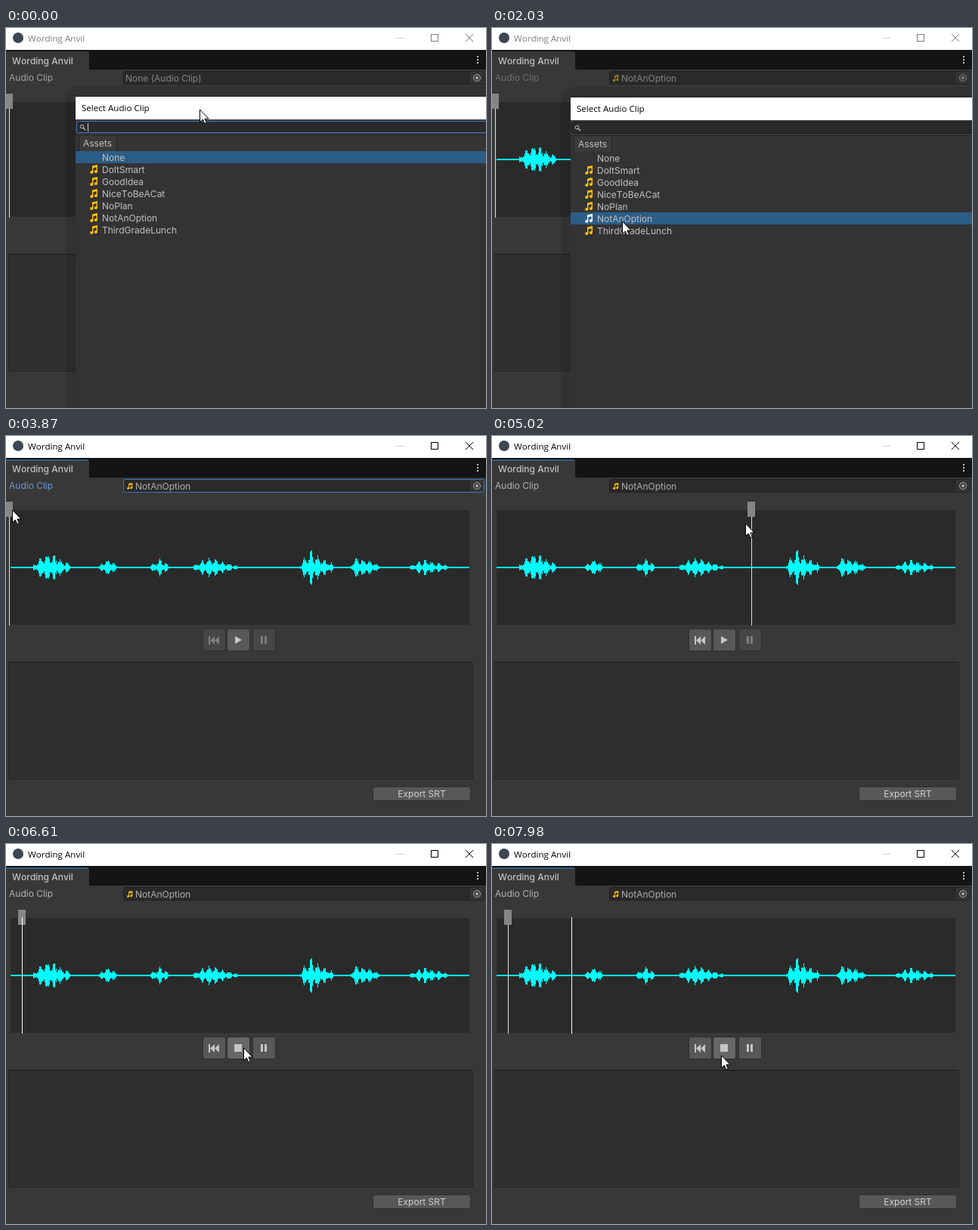
An HTML page with a canvas for the animation above (8 s loop, 635x503 px).

```html
<!DOCTYPE html>
<html lang="en">
<head>
<meta charset="utf-8">
<style>
  html, body { margin: 0; width: 100%; height: 100%; overflow: hidden; background: #383838; }
  canvas { display: block; }
</style>
</head>
<body>
<canvas id="stage" width="635" height="503"></canvas>
<script>
const ctx = document.getElementById('stage').getContext('2d');
ctx.fontKerning = 'none';
const LOOP = 8000;
const SELECT = 1780, DIM = 1980, CLOSE = 2260, GRAB = 4160, DROP = 5480, PLAY = 6560, RUN = 6610;
const UI = '12px Inter, sans-serif', SYSTEM = '11.6px "Open Sans", sans-serif';
const APP = 'Wording Anvil';
const CLIPS = ['None', 'DoItSmart', 'GoodIdea', 'NiceToBeACat', 'NoPlan', 'NotAnOption', 'ThirdGradeLunch'];

// Eased pointer moves; it rests in between
const START = { x: 257, y: 108 };
const MOVES = [
  { from: 60, to: 210, x: 269, y: 109 },
  { from: 330, to: 820, x: 158, y: 240 },
  { from: 1360, to: 1600, x: 173, y: 256 },
  { from: 2400, to: 3030, x: 246, y: 289 },
  { from: 3090, to: 3870, x: 9, y: 98 },
  { from: GRAB, to: 4700, x: 520, y: 112 },
  { from: 4700, to: DROP, x: 21, y: 122 },
  { from: 5910, to: 6400, x: 315, y: 270 },
  { from: 6640, to: 7290, x: 312, y: 354 },
  { from: 7290, to: 7960, x: 304, y: 280 }
];

// Spoken words in the clip
const WORDS = [
  { start: 34, peak: 54, end: 87, height: 26 },
  { start: 121, peak: 134, end: 148, height: 14 },
  { start: 188, peak: 203, end: 217, height: 15 },
  { start: 244, peak: 268, end: 311, height: 15 },
  { start: 387, peak: 403, end: 436, height: 26 },
  { start: 455, peak: 463, end: 498, height: 18 },
  { start: 529, peak: 554, end: 591, height: 12 }
];

function rect(x, y, w, h, fill) {
  ctx.fillStyle = fill;
  ctx.fillRect(x, y, w, h);
}

function box(x, y, w, h, fill, border, radius = 0) {
  ctx.beginPath();
  ctx.roundRect(x + .5, y + .5, w - 1, h - 1, radius);
  ctx.fillStyle = fill;
  ctx.fill();
  ctx.strokeStyle = border;
  ctx.lineWidth = 1;
  ctx.stroke();
}

function text(str, x, y, fill, font = UI, align = 'left') {
  ctx.font = font;
  ctx.textAlign = align;
  ctx.fillStyle = fill;
  ctx.fillText(str, x, y);
}

function poly(points, fill) {
  ctx.beginPath();
  points.forEach(([x, y]) => ctx.lineTo(x, y));
  ctx.closePath();
  ctx.fillStyle = fill;
  ctx.fill();
}

function line(x1, y1, x2, y2, stroke, width = 1) {
  ctx.beginPath();
  ctx.moveTo(x1, y1);
  ctx.lineTo(x2, y2);
  ctx.strokeStyle = stroke;
  ctx.lineWidth = width;
  ctx.stroke();
}

function circle(x, y, r, fill) {
  ctx.beginPath();
  ctx.arc(x, y, r, 0, 7);
  ctx.fillStyle = fill;
  ctx.fill();
}

function ring(x, y, r, stroke) {
  ctx.beginPath();
  ctx.arc(x, y, r, 0, 7);
  ctx.strokeStyle = stroke;
  ctx.lineWidth = 1;
  ctx.stroke();
}

function pointerAt(t) {
  let { x, y } = START;
  for (const move of MOVES) {
    const u = Math.min(1, Math.max(0, (t - move.from) / (move.to - move.from)));
    const ease = u * u * (3 - 2 * u);
    x += (move.x - x) * ease;
    y += (move.y - y) * ease;
  }
  return { x: Math.round(x), y: Math.round(y) };
}

function note(x, y, fill, scale = 1) {
  ctx.save();
  ctx.translate(x, y);
  ctx.scale(scale, scale);
  poly([[3, 1.5], [10, 0], [10, 3], [3, 4.5]], fill);
  rect(3, 2, 1.4, 8, fill);
  rect(8.6, 1, 1.4, 8, fill);
  circle(2.3, 10, 2.1, fill);
  circle(7.9, 9, 2.1, fill);
  ctx.restore();
}

function titleBar(active) {
  const ink = active ? '#000' : '#7c7c7c';
  rect(0, 0, 635, 29, '#fff');
  circle(16, 13, 7, '#3d4653');
  text(APP, 29, 18, ink, SYSTEM);
  rect(517, 13, 10, 1, '#d0d0d0');
  ctx.strokeStyle = ink;
  ctx.lineWidth = 1;
  ctx.strokeRect(562.5, 8.5, 9, 9);
  line(608, 8, 618, 18, ink);
  line(618, 8, 608, 18, ink);
}

function tabStrip(active) {
  rect(0, 29, 635, 26, '#141414');
  ctx.beginPath();
  ctx.roundRect(0, 31, 110, 25, [0, 3, 0, 0]);
  ctx.fillStyle = '#383838';
  ctx.fill();
  if (active) rect(0, 31, 109, 2, '#2c5d87');
  text(APP, 8, 48, '#c2c2c2', '500 ' + UI);
  for (let y = 37; y <= 45; y += 4) rect(623, y, 2, 2, '#c4c4c4');
}

function clipField(t) {
  const disabled = t >= DIM && t < CLOSE, focused = t >= CLOSE && t < GRAB;
  const label = disabled ? '#6f6f6f' : focused ? '#7099d6' : t < CLOSE ? '#a2a2a2' : '#b2b2b2';
  const ink = disabled ? '#858585' : '#b0b0b0';
  text('Audio Clip', 4, 70, label);
  box(155, 57, 478, 18, '#2a2a2a', focused ? '#3a79bb' : '#202020', 2);
  rect(614, 58, 18, 16, '#343434');
  if (t >= SELECT) {
    note(160, 62, disabled ? '#a78319' : '#ffc107', .72);
    text(CLIPS[5], 171, 71, ink);
  } else {
    text('None (Audio Clip)', 158, 71, '#858585');
  }
  ring(623, 66, 4.4, ink);
  circle(623, 66, 1.9, ink);
}

// Each word swells to its peak, rippled by syllables and roughened by noise
function waveform() {
  rect(6, 173, 607, 2, '#0ff');
  for (const { start, peak, end, height } of WORDS) {
    for (let x = start; x < end; x++) {
      const swell = x < peak ? (x - start) / (peak - start) : (end - x) / (end - peak);
      const syllable = .68 + .32 * Math.cos((x - peak) * .7);
      const noise = Math.abs(Math.sin(x * 127.1) * 43758.5) % 1;
      const h = Math.round(height * swell ** .8 * syllable * (.5 + .5 * noise));
      rect(x, 174 - h, 1, 2 * h, '#0ff');
    }
  }
}

function button(x, enabled, mouse, icon) {
  const hover = enabled && mouse.x >= x && mouse.x < x + 29 && mouse.y >= 256 && mouse.y < 285;
  box(x - 1, 255, 31, 30, hover ? '#676767' : enabled ? '#585858' : '#464646', '#303030', 3);
  icon(enabled ? '#c6c6c6' : '#7f7f7f');
}

function controls(t, mouse) {
  const playing = t >= PLAY;
  button(261, t > GRAB + 40, mouse, ink => {
    rect(268, 265, 2, 11, ink);
    for (const x of [270, 276]) poly([[x, 270.5], [x + 6, 265], [x + 6, 276]], ink);
  });
  button(293, true, mouse, ink => {
    if (playing) rect(302, 265, 10, 10, ink);
    else poly([[303, 265], [312, 270], [303, 275]], ink);
  });
  button(327, playing, mouse, ink => {
    rect(337, 265, 3, 10, ink);
    rect(342, 265, 3, 10, ink);
  });
}

function dialog(t) {
  const dragged = pointerAt(Math.min(t, MOVES[0].to));
  const searching = t < SELECT, selected = searching ? 0 : 5;
  ctx.save();
  ctx.translate(92 + dragged.x - START.x, dragged.y - START.y);
  ctx.beginPath();
  ctx.roundRect(-13, 77, 700, 500, 18);
  ctx.fillStyle = 'rgba(0,0,0,.11)';
  ctx.fill();
  rect(0, 90, 640, 1, '#2a2a2a');
  rect(0, 91, 640, 30, '#fff');
  text('Select Audio Clip', 8, 110, '#000', SYSTEM);
  rect(0, 121, 640, 400, '#333');
  rect(0, 121, 640, 20, '#3a3a3a');
  box(1, 123, 650, 16, '#2a2a2a', searching ? '#3a79bb' : '#1c1c1c', 3);
  ring(8.5, 130.5, 2.3, '#c4c4c4');
  line(10.2, 132.2, 13, 135, '#c4c4c4', 1.4);
  if (searching) rect(16, 126, 1, 11, '#d8d8d8');
  rect(0, 141, 640, 22, '#353535');
  rect(0, 141, 640, 1, '#262626');
  rect(4, 142, 51, 21, '#262626');
  rect(5, 142, 49, 21, '#3a3a3a');
  text('Assets', 10, 157, '#c0c0c0');
  CLIPS.forEach((name, i) => {
    const y = 163 + i * 16;
    if (i === selected) rect(0, y, 640, 16, '#2c5d87');
    if (i) note(19, y + 2, i === selected ? '#fff' : '#ffc107');
    text(name, 35, y + 12.5, '#c0c0c0');
  });
  ctx.restore();
}

function pointer({ x, y }) {
  ctx.save();
  ctx.translate(x - .5, y);
  poly([[0, 0], [0, 16.5], [3.8, 13], [6.3, 18.6], [8.8, 17.5], [6.4, 12], [11.6, 12]], '#fff');
  ctx.strokeStyle = '#000';
  ctx.lineWidth = 1;
  ctx.stroke();
  ctx.restore();
}

function playhead(t) {
  const x = t < GRAB ? 4 : Math.max(4, pointerAt(Math.min(t - 7, DROP)).x);
  rect(x - 5, 87, 10, 20, '#868686');
  rect(x, 107, 1, 144, '#dedede');
  if (t >= RUN) rect(Math.floor(x + (t - RUN) * .0618), 97, 1, 154, '#fff');
}

function draw(t) {
  const mouse = pointerAt(t), active = t >= CLOSE;
  rect(0, 0, 635, 503, '#383838');
  titleBar(active);
  tabStrip(active);
  clipField(t);
  rect(6, 98, 607, 152, '#2a2a2a');
  if (t >= SELECT) waveform();
  playhead(t);
  controls(t, mouse);
  box(3, 299, 615, 156, '#303030', '#262626', 1);
  rect(4, 299, 613, 1, '#191919');
  box(485, 464, 130, 19, '#585858', '#303030', 3);
  text('Export SRT', 550, 478, '#d2d2d2', UI, 'center');
  if (!active) dialog(t);
  pointer(mouse);
}

function tick() {
  draw(performance.now() % LOOP);
  requestAnimationFrame(tick);
}
tick();
</script>
</body>
</html>
```
